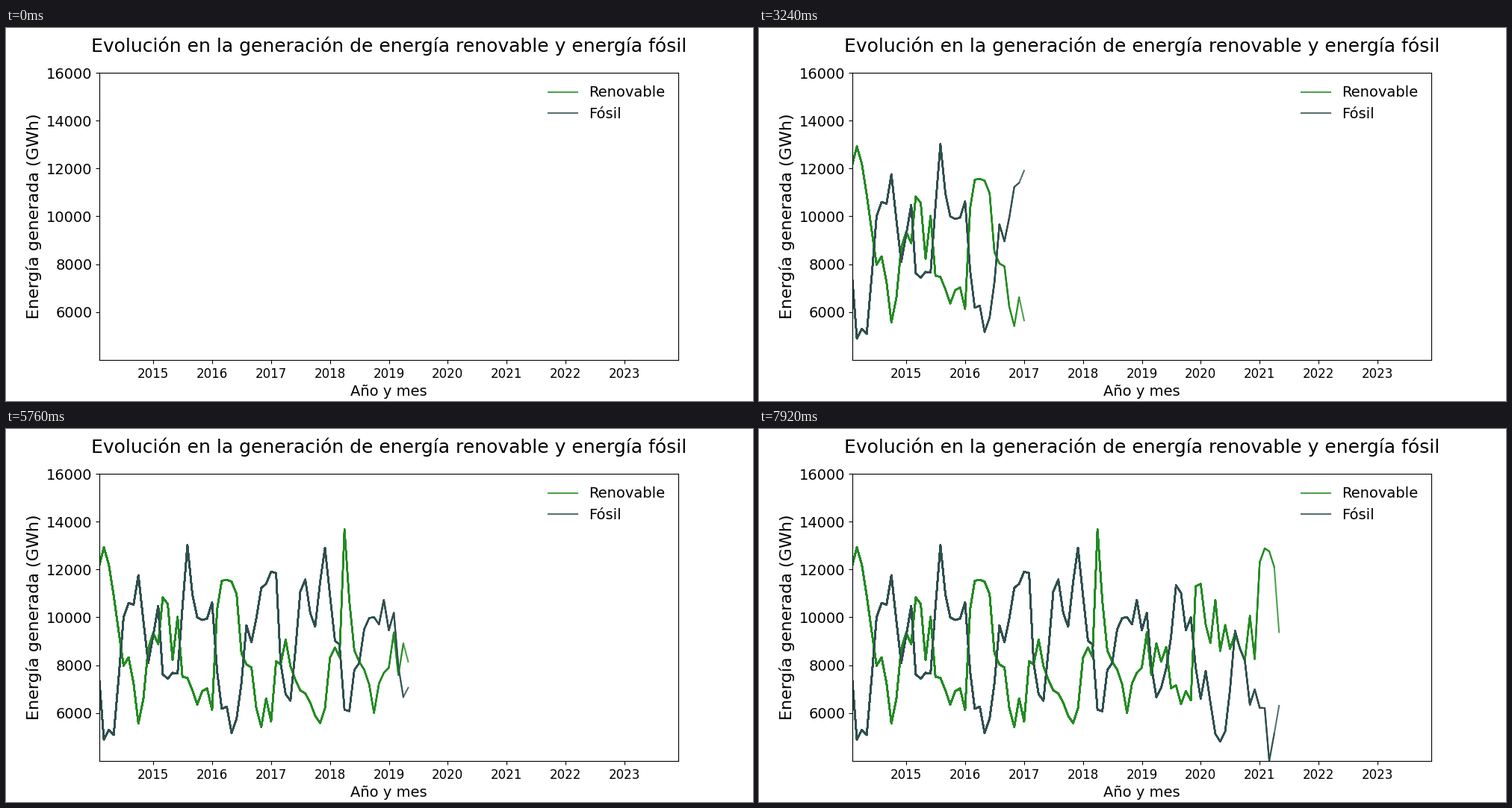
These frames come from a looping animation (1000x500 px, 8 s). A matplotlib script:

```python
import numpy as np
import matplotlib.pyplot as plt
from matplotlib.animation import FuncAnimation

LOOP_MS = 8000
STEPS = 89

# Monthly energy in GWh, February 2014 to May 2021
RENEWABLE = [
    12180, 12920, 12190, 10900, 9400, 7980, 8330, 7250, 5570, 6600, 8700,
    9350, 8880, 10830, 10560, 8230, 10020, 7520, 7470, 6950, 6360, 6920, 7030,
    6130, 10330, 11530, 11570, 11490, 10970, 8500, 8030, 7910, 6220, 5420, 6620,
    5650, 8170, 8030, 9070, 7960, 7380, 6950, 6820, 6430, 5890, 5580, 6200,
    8310, 8740, 8340, 13680, 10700, 8620, 8150, 7820, 7200, 6010, 7240, 7680,
    7900, 9370, 7590, 8910, 8150, 8760, 7040, 7160, 6370, 6920, 6530, 11300,
    11400, 9700, 8930, 10730, 8600, 9680, 8680, 9320, 8700, 8220, 10070, 8260,
    12300, 12880, 12760, 12110, 9380,
]
FOSSIL = [
    7350, 4900, 5300, 5090, 7500, 10000, 10600, 10530, 11760, 9850, 8100,
    9250, 10480, 7620, 7440, 7680, 7660, 10400, 13020, 10950, 10000, 9890, 9950,
    10630, 7750, 6180, 6270, 5170, 5770, 7250, 9670, 8960, 9950, 11230, 11400,
    11910, 11850, 8090, 6790, 6520, 8650, 11080, 11580, 10170, 9610, 11480, 12910,
    10920, 9020, 8870, 6140, 6080, 7800, 8090, 9500, 9970, 10010, 9710, 10730,
    9460, 10190, 7950, 6670, 7060, 7870, 9170, 11340, 11020, 9460, 10000, 7900,
    6600, 7760, 6450, 5130, 4810, 5240, 6990, 9440, 8680, 8180, 6350, 6990,
    6220, 6210, 4000, 5140, 6310,
]
SERIES = [
    ("Renovable", RENEWABLE, "forestgreen"),
    ("Fósil", FOSSIL, "darkslategray"),
]


def days(months):
    """Day number of the first of each month."""
    return np.array(months, dtype="datetime64[M]").astype("datetime64[D]").astype(int)


dates = days(np.arange("2014-02", "2021-06", dtype="datetime64[M]"))
years = range(2015, 2024)

plt.rcParams["font.family"] = "DejaVu Sans"
fig, ax = plt.subplots(figsize=(10, 5), dpi=100)
ax.set_title("Evolución en la generación de energía renovable y energía fósil",
             fontsize=18, pad=20)
ax.set_xlabel("Año y mes", fontsize=14)
ax.set_ylabel("Energía generada (GWh)", fontsize=16)
ax.set_xlim(days("2014-02"), days("2023-12"))
ax.set_ylim(4000, 16000)
ax.set_xticks(days([f"{y}-01" for y in years]), [str(y) for y in years], fontsize=12)
ax.set_yticks(range(6000, 16001, 2000))
ax.tick_params(axis="y", labelsize=14)

for name, _, color in SERIES:
    ax.plot([], [], color=color, alpha=0.8, lw=1.5, label=name)
ax.legend(loc="upper right", fontsize=14, frameon=False)

# Each step adds a translucent pair of lines over the earlier ones
layers = []
for n in range(STEPS):
    layers.append([
        ax.plot(dates[:n], values[:n], color=color, alpha=0.8, lw=1.5)[0]
        for _, values, color in SERIES
    ])


def update(step):
    for n, pair in enumerate(layers):
        for line in pair:
            line.set_visible(1 < n <= step)
    return [line for pair in layers for line in pair]


anim = FuncAnimation(fig, update, frames=STEPS, interval=LOOP_MS / STEPS,
                     repeat=True, repeat_delay=0, blit=False)
plt.show()
```
